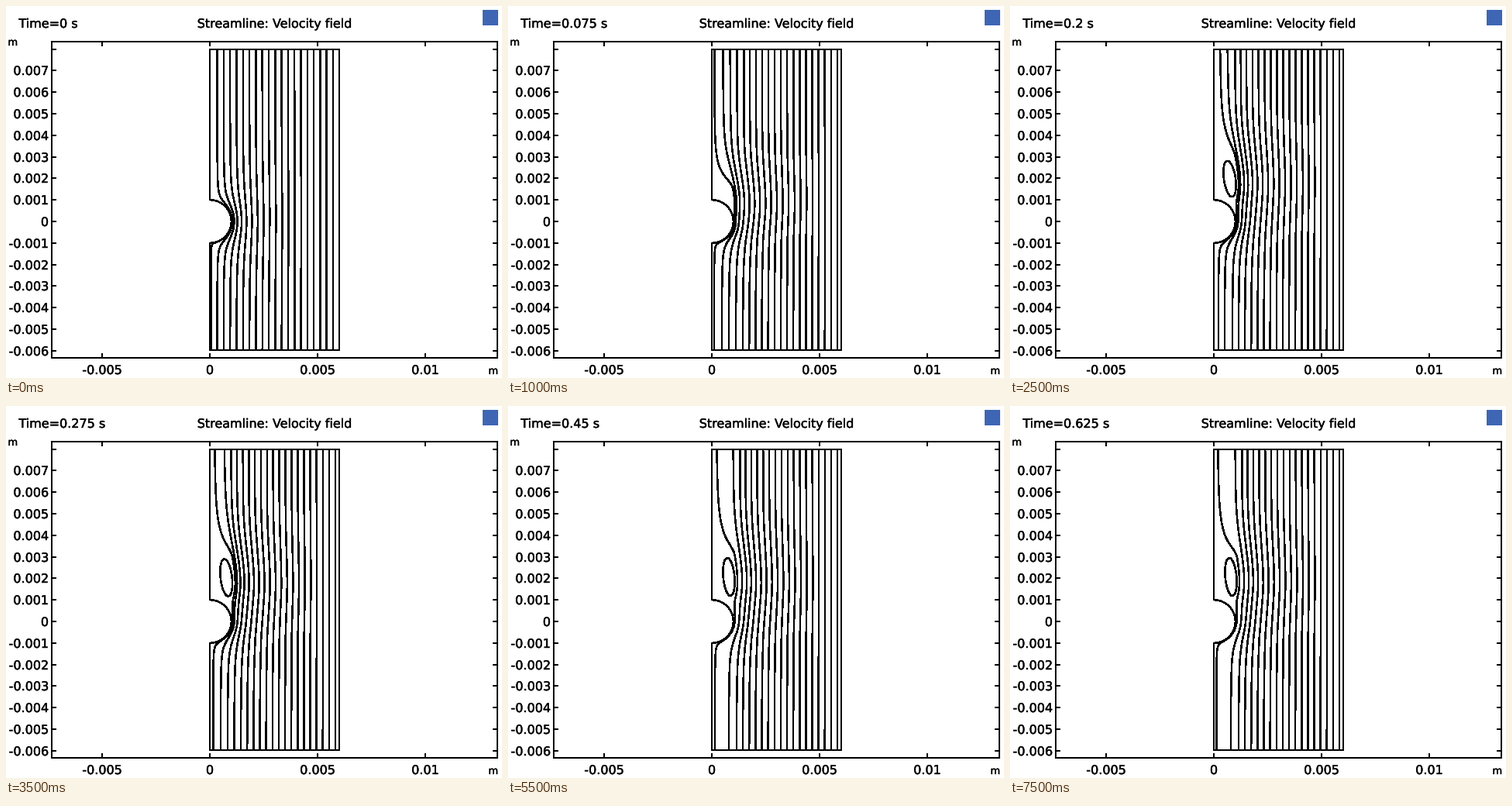
Animation of 640 by 480 pixels, one loop 8 s. Source, as a matplotlib script:

```python
import matplotlib.pyplot as plt
import matplotlib.patheffects as pe
import numpy as np
from matplotlib.animation import FuncAnimation
from matplotlib.patches import Rectangle

W, H, DPI = 640, 480, 100
FRAMES, INTERVAL = 16, 500
PT = 72 / DPI
X0, Y0, MM = 263, 278, 27.8        # origin in pixels, pixels per millimetre
BOX = (59, 46, 634, 454)

plt.rcParams["font.family"] = "DejaVu Sans"
fig = plt.figure(figsize=(W / DPI, H / DPI), dpi=DPI, facecolor="white")
ax = fig.add_axes([0, 0, 1, 1])
ax.set_xlim(0, W)
ax.set_ylim(H, 0)
ax.axis("off")


def line(x=(), y=(), width=1.5):
    return ax.plot(x, y, color="black", lw=width * PT, antialiased=False,
                   snap=False, solid_joinstyle="miter",
                   solid_capstyle="butt")[0]


def label(x, y, text, ha="left", size=16):
    bold = pe.withStroke(linewidth=0.45 * PT, foreground="black")
    return ax.text(x, y, text, ha=ha, va="baseline", fontsize=size * PT,
                   color="black", path_effects=[bold])


def draw_axes():
    l, t, r, b = BOX
    line([l, r, r, l, l, r], [t, t, b, b, t, t], 2)
    for v in (-5, 0, 5, 10):
        x = round(X0 + v * MM)
        line([x, x], [t, t + 6], 2)
        line([x, x], [b - 6, b], 2)
        label(x, 475, f"{v / 1000:g}", "center")
    for v in range(-6, 9):
        y = round(Y0 - v * MM)
        line([l, l + 6], [y, y], 2)
        line([r - 6, r], [y, y], 2)
        if v < 8:
            label(55, y + 6, f"{v / 1000:g}", "right")
    label(2.5, 51, "m", size=13)
    label(622.5, 475, "m", size=13)
    label(347, 28, "Streamline: Velocity field", "center")
    ax.add_patch(Rectangle((615, 5), 20, 20, color="#3f66b5", lw=0))


def draw_domain():
    a = np.linspace(-np.pi / 2, np.pi / 2, 120)
    line(X0 + MM * np.cos(a), Y0 - MM * np.sin(a))
    line([X0, X0, 430, 430, X0, X0], [250, 56, 56, 444, 444, 305], 2)


draw_axes()
draw_domain()
clock = label(16.5, 28, "")
streams = [line() for _ in range(21)]
vortex = line()

Z = np.linspace(-6, 8, 400)

# wake parameters over time
T = [0.025, 0.075, 0.125, 0.2, 0.275, 0.45]
WAKE = dict(
    centre=[0.5, 0.8, 1.4, 1.7, 1.75, 1.8],
    width=[1.6, 1.8, 2.0, 2.1, 2.15, 2.2],
    swell=[0.98, 0.95, 0.95, 1.03, 1.05, 1.0],
    tail=[0.05, 0.15, 0.2, 0.25, 0.32, 0.4],
    close=[1.5, 2.1, 2.9, 3.1, 3.25, 3.35],
    spread=[0.14, 0.1, 0.06, 0.055, 0.053, 0.052],
)
# vortex loop: centre x, centre y, half width, half height, lean
LOOP_T = [0.125, 0.2, 0.275, 0.45]
LOOP = [[282, 283.5, 284.2, 285], [226.5, 223, 221.5, 220.5],
        [8, 7.6, 7.5, 7.3], [22.5, 23.2, 24, 24.5], [4, 3, 2.5, 2]]
# inlet positions of the four innermost lines
SEED_T = [0.075, 0.125, 0.2, 0.275]
SEEDS = [[266, 271, 269, 267.3], [276, 279, 277, 277],
         [285, 288, 287, 286], [294, 295, 295, 294.5]]


def potential(b):
    """Gain in r squared for ideal flow past a unit sphere."""
    lo = np.maximum(1 - Z**2, b * b)
    hi = np.full_like(Z, b * b + 1.1)
    for _ in range(36):
        mid = (lo + hi) / 2
        low = mid * (1 - (mid + Z**2) ** -1.5) < b * b
        lo, hi = np.where(low, mid, lo), np.where(low, hi, mid)
    return (lo + hi) / 2 - b * b


def streamline(b, t):
    p = {k: np.interp(t, T, v) for k, v in WAKE.items()}
    far = 1 - b * b / 36
    behind = np.maximum(Z - p["centre"], 0) / p["width"]
    bulge = p["tail"] + p["swell"] * np.exp(-behind**2)
    core = p["spread"] * 0.25 * np.logaddexp(0, (Z - p["close"]) / 0.25)
    wake = bulge * far**1.5 * (1 - np.exp(-b * b / np.maximum(core, 1e-9)))
    u = np.clip((Z + 1) / (p["centre"] + 1), 0, 1)
    s = u * u * (3 - 2 * u) * np.interp(t, [0, 0.025, 0.075], [0, 0.4, 1])
    gain = (1 - s) * potential(b) * far + s * wake
    return np.sqrt(b * b + gain)


def inlets(t):
    if t == 0:
        return np.linspace(272.5, 422, 19)
    if t < 0.05:
        return np.linspace(268.5, 422.5, 19)
    if t < 0.3:
        inner = [np.interp(t, SEED_T, s) for s in SEEDS]
    else:
        inner = [np.interp(t, [0.325, 0.45, 0.625], [267.2, 267, 266.3]),
                 285, 295]
    return np.concatenate([inner, 303 + 8.13 * np.arange(16)])


def update(i):
    t = (i * 5 // 3) * 0.025
    clock.set_text(f"Time={t:.3g} s")
    xs = inlets(t)
    for k, art in enumerate(streams):
        if k < len(xs):
            r = streamline((xs[k] - X0) / MM, t)
            art.set_data(X0 + MM * r, Y0 - MM * Z)
        else:
            art.set_data([], [])
    if t == 0:
        part = Z < -0.5
        r = streamline(0.05, t)
        streams[-1].set_data(X0 + MM * r[part], Y0 - MM * Z[part])
    if t > 0.1:
        cx, cy, a, h, lean = (np.interp(t, LOOP_T, v) for v in LOOP)
        q = np.linspace(0, 2 * np.pi, 90)
        vortex.set_data(cx + a * np.cos(q) + lean * np.sin(q),
                        cy + h * np.sin(q))
    else:
        vortex.set_data([], [])
    return [clock, vortex, *streams]


anim = FuncAnimation(fig, update, frames=FRAMES, interval=INTERVAL,
                     repeat=True, repeat_delay=0, blit=False)
plt.show()
```
